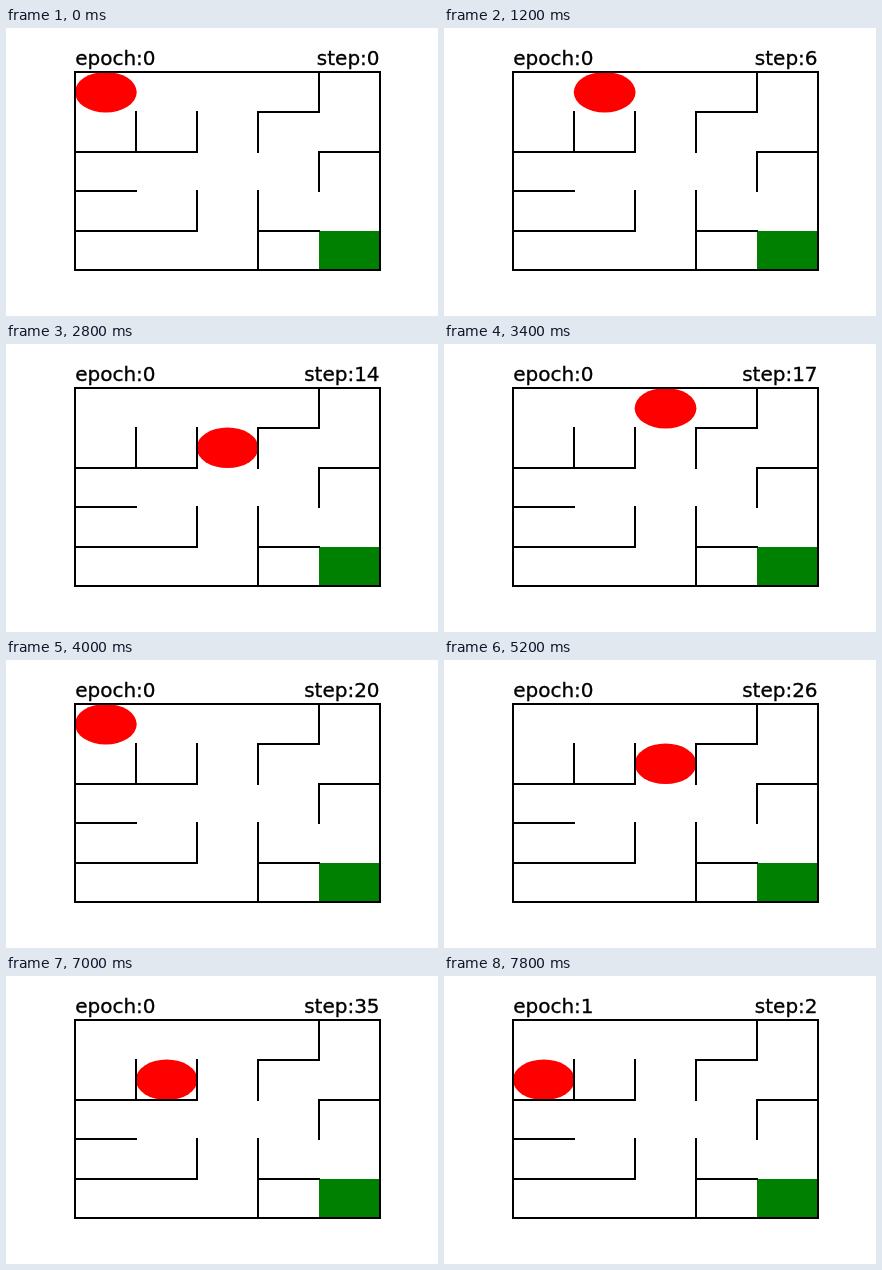
Write an HTML page that moves like this. It is 432 px wide and 288 px high and loops after 8000 ms.

```html
<!DOCTYPE html>
<html lang="en">
<head>
<meta charset="utf-8">
<title>Maze walk</title>
<style>
  html, body { margin: 0; width: 100%; height: 100%; overflow: hidden; background: #fff; }
  svg { display: block; width: 432px; height: 288px; }
  text { font: 20px "DejaVu Sans", sans-serif; stroke: #000; stroke-width: .3; }
</style>
</head>
<body>
<svg viewBox="0 0 432 288">
  <rect x="313" y="203" width="61" height="39" fill="#008000"/>
  <ellipse id="walker" rx="30.9" ry="20.3" fill="#f00"/>
  <path fill="none" stroke="#000" stroke-width="2" stroke-linecap="square" d="
    M69 44H374V242H69Z
    M313 44V84H252V124
    M130 84V124 M191 84V124H69
    M374 124H313V163
    M69 163H130
    M191 163V203H69
    M252 163V242 M252 203H313"/>
  <text id="epoch" x="69.2" y="37"></text>
  <text id="step" x="373.6" y="37" text-anchor="end"></text>
</svg>
<script>
  const STEP_MS = 200;
  // One letter per step; a dot is a bump into a wall.
  const EPOCHS = [".D..URRR...LD...ULL...RRD.DU.ULD....", "D."];
  const MOVES = { L: [-1, 0], R: [1, 0], U: [0, -1], D: [0, 1], ".": [0, 0] };

  const states = EPOCHS.flatMap((moves, epoch) => {
    let col = 0, row = 0;
    const walk = [{ epoch, step: 0, col, row }];
    [...moves].forEach((move, i) => {
      col += MOVES[move][0];
      row += MOVES[move][1];
      walk.push({ epoch, step: i + 1, col, row });
    });
    return walk;
  });

  const byId = id => document.getElementById(id);
  const walker = byId("walker"), epochLabel = byId("epoch"), stepLabel = byId("step");
  const start = performance.now();
  let shown = -1;

  function draw() {
    const elapsed = Math.max(0, performance.now() - start);
    const index = Math.floor(elapsed / STEP_MS) % states.length;
    if (index !== shown) {
      const { epoch, step, col, row } = states[index];
      walker.setAttribute("cx", 99.8 + 60.87 * col);
      walker.setAttribute("cy", 64.2 + 39.6 * row);
      epochLabel.textContent = "epoch:" + epoch;
      stepLabel.textContent = "step:" + step;
      shown = index;
    }
    requestAnimationFrame(draw);
  }
  draw();
</script>
</body>
</html>
```
